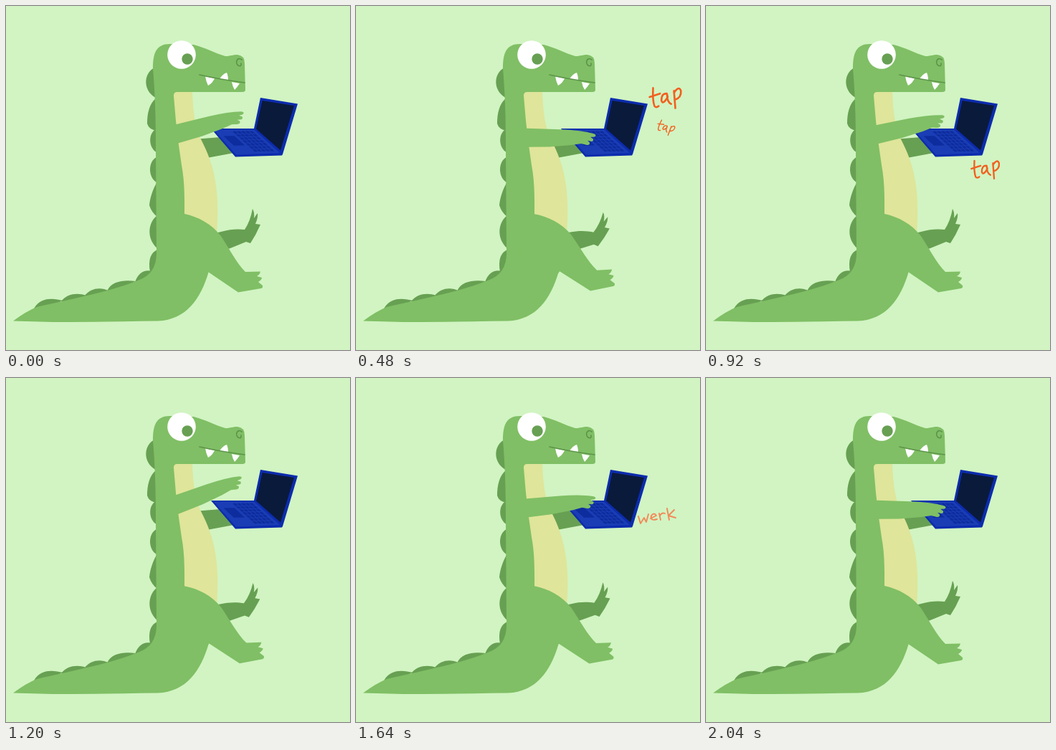
Write an HTML page that moves like this. It is 480 px wide and 480 px high and loops after 2.16 s.

```html
<!DOCTYPE html>
<html lang="en">
<head>
<meta charset="utf-8">
<title>Typing crocodile</title>
<style>
  html, body { margin: 0; width: 100%; height: 100%; overflow: hidden; background: #d1f4c2; }
  svg { display: block; width: 100%; height: 100%; }
  .skin { fill: #80bf65; }
  .dark { fill: #67a052; }
  .word { fill: none; stroke: #f2601f; stroke-width: 2.7; stroke-linecap: round; stroke-linejoin: round; }
  .thin { stroke: #f28a59; stroke-width: 1.9; }
</style>
</head>
<body>
<svg viewBox="0 0 480 480">
  <defs>
    <path id="tap" d="M-18-14Q-19 4-16 12Q-14 15-10 12M-23-1L-8-6
      M2-6Q-6-7-6 4Q-4 11 3-1L2-5Q2 6 8 9
      M12-10L14 15M12-7Q19-18 22-10Q23 0 13 3"/>
    <path id="werk" d="M-25 0L-22 10L-17 2L-14 8L-11-3
      M-8 3L0-1Q-3-6-7-1Q-9 7 1 4
      M4-4L6 5M5-1Q8-6 12-4
      M15-11L18 5M25-9L17-1L27 2"/>
  </defs>

  <!-- back ridge -->
  <path class="dark" d="M208 86C192 92 190 118 209 128Z
    M209 129C200 136 197 150 197 164Q199 172 210 174Z
    M209 172C198 178 199 198 210 204Z
    M210 211C198 217 198 239 210 246Z
    M210 247C205 256 201 267 200 278Q203 288 211 294Z
    M210 293C197 304 197 326 211 338Z
    M212 340C202 343 198 354 201 371L212 371Z
    M204 370Q187 366 180 385L200 380Z
    M181 384C166 382 147 383 141 398L160 396Z
    M143 397C132 392 118 393 109 405L125 405Z
    M112 404C100 400 86 401 77 412L95 412Z
    M79 411C67 408 49 405 39 422L60 420Z"/>

  <path id="backLeg" class="dark" d="M285 319L300 315C313 311 325 311 333 312Q341 300 344 283Q347 288 346 296L351 289
    Q352 295 348 304L355 305Q349 319 341 331L335 329L313 338L290 345Z"/>
  <path class="dark" d="M262 186L312 182L318 205L275 213Z"/>

  <!-- body, tail and head -->
  <path class="skin" d="M205 88C205 66 209 53 229 53L262 54C278 58 292 66 306 70C313 70 316 68 323 68
    Q333 69 333 80L334 117Q334 120 330 120L250 120L258 300L283 370C272 409 251 438 212 439.500
    Q110 441 65 441L10 439.500Q28 426 43 420C100 407 150 397 184 383Q210 374 210 345L209 200Q209 130 205 88Z"/>
  <path fill="#dfe59a" d="M234 125Q234 120 239 120L260 120C261 148 264 170 272 186C290 220 299 256 294 318L249 300
    C249 275 250 248 245 222Q240 190 237 160Z"/>
  <path id="leg" class="skin" d="M230 290L249 290C268 294 287 304 300 321C313 341 322 359 334 371L355 370.500
    Q354 375 350 377L357 379Q357 382 352 385L358 390Q359 393 356 394L324 399.500L282 371L262 395L230 390Z"/>

  <!-- face -->
  <g id="eye">
    <circle cx="245" cy="68" r="19.800" fill="#fff"/>
    <circle class="dark" cx="253" cy="74" r="7.700"/>
  </g>
  <path fill="#fff" d="M278 98L291 101Q288 108 282 111Q279 105 278 98ZM298 102Q302 95 308 93Q310 97 310 104ZM315 106L326 108Q323 113 319 117Q316 112 315 106Z"/>
  <path fill="none" stroke="#5c9449" stroke-width="1.700" stroke-linecap="round" d="M270 96Q296 102 333 107M329 75C323 70 319 79 324 83Q329 85 328 80"/>

  <!-- laptop -->
  <path fill="#0c2cae" d="M355 128L407 136.500L386 207L385 208.500L320 210.500L286 171L346 171Z"/>
  <path fill="#0a1a3b" d="M357.500 132L402 139L383 201.500L349 171.500Z"/>
  <path fill="#1a3db5" d="M290 172.500L346 172.500L382 205L321 207.500Z"/>
  <g id="keys" fill="#0d2c9d" transform="matrix(36 33 -58 1 347 172)"></g>

  <path id="arm" class="skin" d="M214 171L240 171L285 173Q315 174.500 332 179.500Q337 182 332 184L327 184L331 187
    Q331 191 327 190L323 189L326 192Q326 196 321 195L314 193L300 195L270 197L214 197Z"/>

  <g id="words"></g>
</svg>
<script>
const el = id => document.getElementById(id);
const NS = "http://www.w3.org/2000/svg";

function add(parent, tag, attrs) {
  const node = document.createElementNS(NS, tag);
  for (const name in attrs) node.setAttribute(name, attrs[name]);
  return parent.appendChild(node);
}

// Keyboard in laptop-base units: x along the hinge, y away from it
for (let row = 0; row < 5; row++)
  for (let col = 0; col < 7; col++)
    add(el("keys"), "rect", { x: .07 + col * .126, y: .1 + row * .1, width: .1, height: .075 });
add(el("keys"), "rect", { x: .26, y: .65, width: .4, height: .26 });

// word, start, end, x, y, turn, scale
const words = [
  ["tap", 360, 680, 432, 128, 0, .97],
  ["tap", 440, 760, 432, 170, 25, .53],
  ["tap", 800, 1080, 390, 228, 0, .86],
  ["werk", 1400, 1560, 441, 118, -4, 1],
  ["werk", 1560, 1760, 419, 193, 0, 1],
  ["tap", 1680, 1800, 438, 151, 0, 1],
  ["werk", 1760, 2040, 435, 226, -8, 1.080]
].map(([name, start, end, x, y, turn, scale]) => ({
  start, end,
  node: add(el("words"), "use", {
    href: "#" + name,
    class: name === "werk" ? "word thin" : "word",
    "stroke-width": 2,
    transform: `translate(${x} ${y}) rotate(${turn}) scale(${scale})`
  })
}));

// Triangle wave: 0 at phase 0, 1 at half a period
const swing = (time, period) => 1 - Math.abs(1 - 2 * ((time / period % 1 + 1) % 1));
const turn = (id, angle, x, y) => el(id).setAttribute("transform", `rotate(${angle} ${x} ${y})`);

function draw(now) {
  const time = Math.floor(now % 2160 / 40) * 40;
  const pose = Math.min(time, 1840);
  const step = swing(pose, 920);

  turn("arm", -22.300 * swing(pose - 500, 1360), 218, 175);
  turn("leg", -1.800 * step, 260, 296);
  turn("backLeg", 5.200 * step, 290, 295);

  const open = Math.max(.08, Math.min(1, Math.abs(time - 240) / 100));
  el("eye").setAttribute("transform", `translate(0 ${68 * (1 - open)}) scale(1 ${open})`);

  for (const w of words)
    w.node.setAttribute("visibility", time >= w.start && time < w.end ? "visible" : "hidden");
}

const begin = performance.now();
function loop() {
  draw(performance.now() - begin);
  requestAnimationFrame(loop);
}
loop();
</script>
</body>
</html>
```
